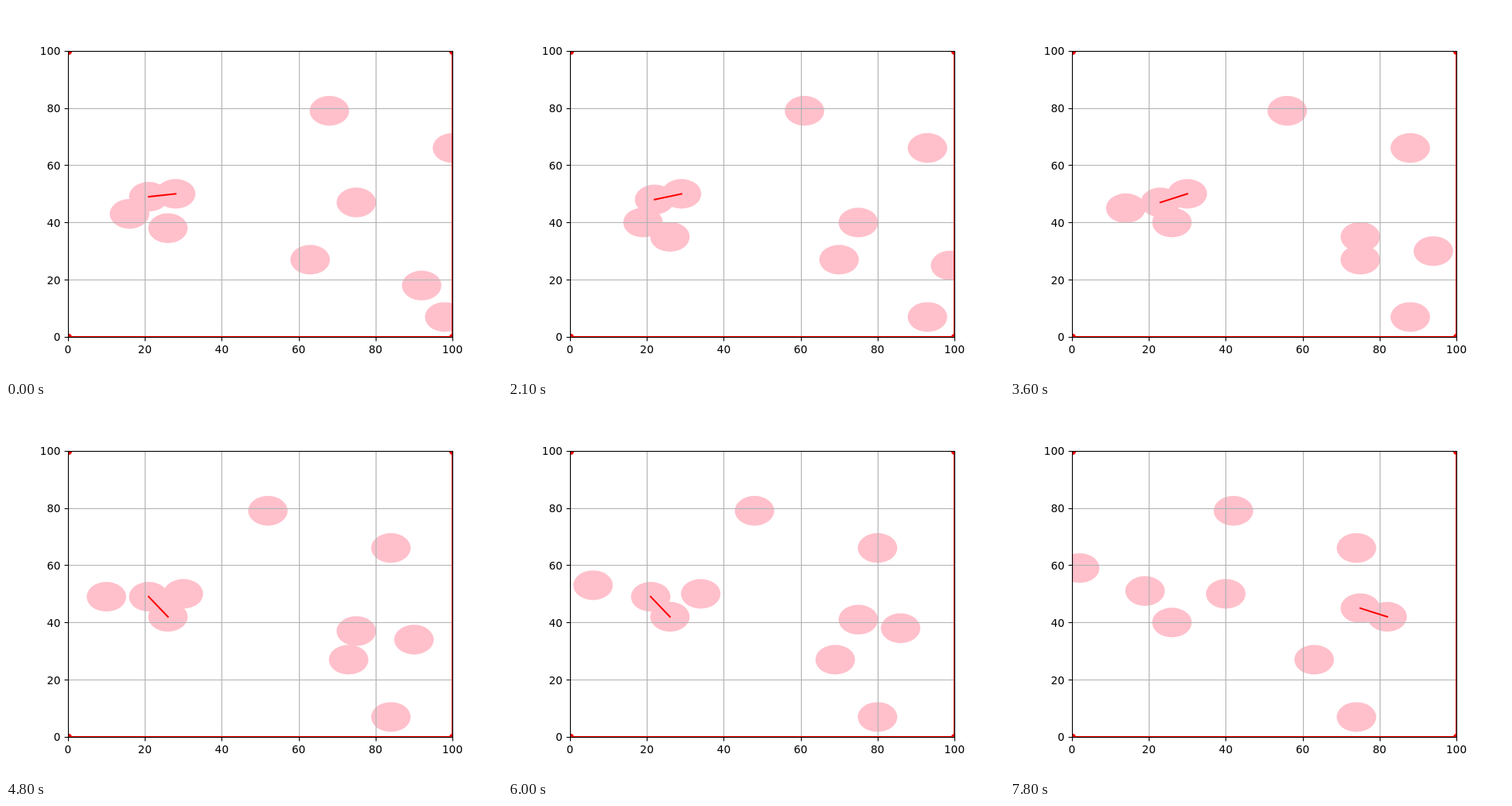
Animation, 640 px wide and 480 px high, one loop 8000 ms. Source, as an HTML page with a canvas:

```html
<!DOCTYPE html>
<html lang="en">
<head>
<meta charset="utf-8">
<title>Closest pair</title>
<style>
  html, body { margin: 0; width: 100%; height: 100%; overflow: hidden; background: #fff; }
  canvas { display: block; }
</style>
</head>
<body>
<canvas id="stage" width="640" height="480"></canvas>
<script>
const ctx = document.getElementById('stage').getContext('2d');
const LOOP = 8000, STEP = 300, PT = 100 / 72;
const TICKS = [0, 20, 40, 60, 80, 100];
const THIN = 0.8 * PT, LINE = 1.5 * PT;

const px = x => 80 + 4.96 * x;
const py = y => 427.2 - 3.696 * y;
const snap = v => Math.floor(v + 0.5);

// x, y, vx, vy in plot units per step
const START = [
  [16, 43, 1, -1],
  [21, 49, -1, 1],
  [28, 50, -1, 0],
  [26, 38, 0, -1],
  [63, 27, 1, 0],
  [75, 47, 0, -1],
  [68, 79, -1, 0],
  [100, 66, -1, 0],
  [92, 18, 1, 1],
  [98, 7, 1, 0]
];

function closest(balls) {
  let best = Infinity, pair;
  balls.forEach((a, i) => {
    for (const b of balls.slice(i + 1)) {
      const d = (a.x - b.x) ** 2 + (a.y - b.y) ** 2;
      if (d < best) { best = d; pair = [a, b]; }
    }
  });
  return pair;
}

function bounce(pos, v) {
  if (pos >= 99) return -Math.abs(v);
  return pos <= 1 ? Math.abs(v) : v;
}

// The closest pair turns back on every step; the walls reflect.
function simulate(count) {
  let balls = START.map(([x, y, vx, vy]) => ({ x, y, vx, vy }));
  const states = [];
  for (let k = 0; k < count; k++) {
    const pair = closest(balls);
    states.push({ balls, pair });
    balls = balls.map(b => {
      const s = pair.includes(b) ? -1 : 1;
      const vx = bounce(b.x, s * b.vx), vy = bounce(b.y, s * b.vy);
      return { x: b.x + vx, y: b.y + vy, vx, vy };
    });
  }
  return states;
}

const states = simulate(Math.ceil(LOOP / STEP));

function line(x1, y1, x2, y2, width, color, cap = 'butt') {
  ctx.lineWidth = width;
  ctx.strokeStyle = color;
  ctx.lineCap = cap;
  ctx.beginPath();
  ctx.moveTo(x1, y1);
  ctx.lineTo(x2, y2);
  ctx.stroke();
}

function oval(x, y, rx, ry, color) {
  ctx.fillStyle = color;
  ctx.beginPath();
  ctx.ellipse(x, y, rx, ry, 0, 0, 2 * Math.PI);
  ctx.fill();
}

function drawPlot({ balls, pair: [a, b] }) {
  ctx.save();
  ctx.beginPath();
  ctx.rect(80, 58, 496, 370);
  ctx.clip();

  const edge = PT / 2;
  for (const { x, y } of balls) oval(px(x), py(y), 24.8 + edge, 18.48 + edge, '#ffc0cb');

  for (const t of TICKS) {
    const x = snap(px(t)) + 0.5, y = snap(py(t)) + 0.5;
    line(x, 58, x, 428, THIN, '#b0b0b0');
    line(80, y, 576, y, THIN, '#b0b0b0');
  }

  ctx.lineWidth = LINE;
  ctx.strokeStyle = '#f00';
  ctx.strokeRect(80, 58, 496, 369);
  for (const x of [80.5, 576.5]) {
    for (const y of [58.5, 427.5]) oval(x, y, 4.7, 4.7, '#f00');
  }
  line(px(a.x), py(a.y), px(b.x), py(b.y), LINE, '#f00', 'square');
  ctx.restore();
}

function drawAxes() {
  ctx.font = 10 * PT + 'px "DejaVu Sans", sans-serif';
  ctx.textBaseline = 'alphabetic';
  for (const t of TICKS) {
    const x = snap(px(t)) + 0.5, y = snap(py(t)) + 0.5;
    line(x, 427.5, x, 432.5, THIN, '#000');
    line(75.5, y, 80.5, y, THIN, '#000');
    ctx.fillStyle = '#000';
    ctx.textAlign = 'center';
    ctx.fillText(t, px(t), 448);
    ctx.textAlign = 'right';
    ctx.fillText(t, 70.3, snap(py(t) + 5.28));
  }
  ctx.lineWidth = THIN;
  ctx.strokeStyle = '#000';
  ctx.strokeRect(80.5, 58.5, 496, 369);
}

let begin, shown = -1;
function frame(now) {
  begin ??= now;
  const k = Math.floor((now - begin) % LOOP / STEP);
  if (k !== shown) {
    shown = k;
    ctx.fillStyle = '#fff';
    ctx.fillRect(0, 0, 640, 480);
    drawPlot(states[k]);
    drawAxes();
  }
  requestAnimationFrame(frame);
}
requestAnimationFrame(frame);
</script>
</body>
</html>
```
